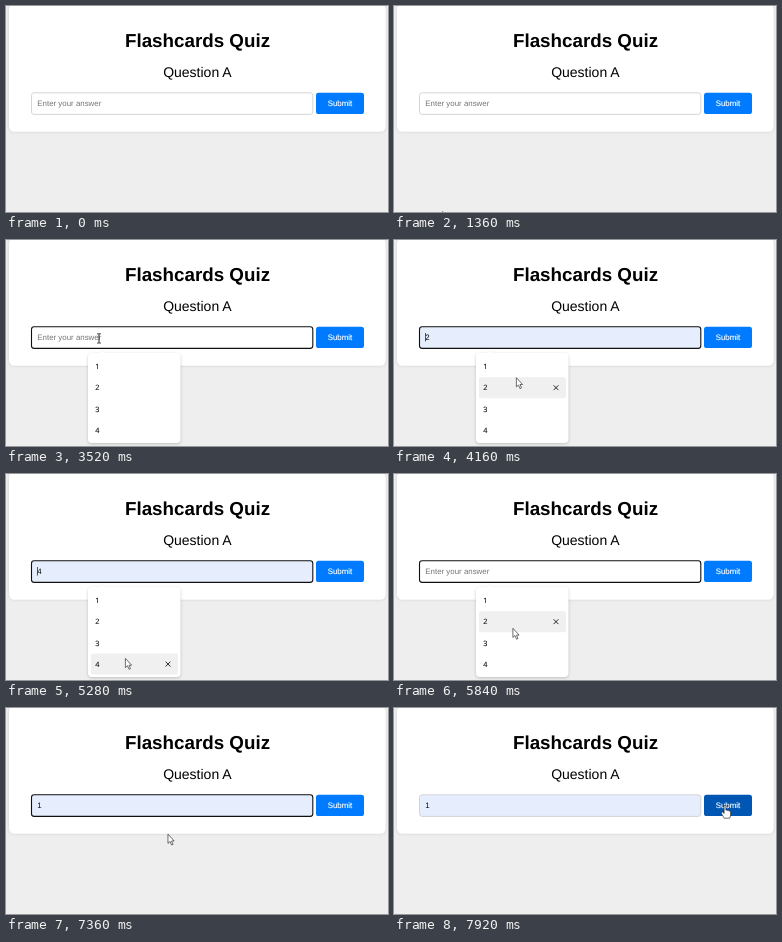
Animation, 382 px wide and 206 px high, one loop 8 s. Source, as an HTML page:

```html
<!DOCTYPE html>
<html lang="en">
<head>
<meta charset="utf-8">
<title>Flashcards Quiz</title>
<style>
  html, body { margin: 0; width: 100%; height: 100%; overflow: hidden; background: #eee; }
  svg { display: block; width: 100%; height: 100%; }
  text { font-family: "Liberation Sans", Arial, sans-serif; text-rendering: geometricPrecision; }
  .mid { text-anchor: middle; }
  .small { font-size: 7.9px; }
  .item { font: 7.3px "Open Sans", sans-serif; fill: #111; stroke: #111; stroke-width: .15px; }
  .label { fill: #fff; stroke: #fff; stroke-width: .15px; }
  .card { filter: drop-shadow(0 .5px 1.8px rgba(0, 0, 0, .13)); }
  .menu { filter: drop-shadow(0 1px 1.5px rgba(0, 0, 0, .2)); }
</style>
</head>
<body>
<svg viewBox="0 0 382 206">
  <rect width="382" height="206" fill="#eee"/>
  <rect class="card" x="3" y="-2" width="376.7" height="127.8" rx="5.5" fill="#fff"/>
  <text class="mid" x="191.5" y="40.7" font-size="18.8" font-weight="bold">Flashcards Quiz</text>
  <text class="mid" x="191.4" y="71.3" font-size="14">Question A</text>

  <rect id="field" x="25.5" y="86.8" width="281.3" height="21.6" rx="2.6"/>
  <text id="value" class="small" x="31.3" y="99.7"></text>
  <rect id="caret" x="31" y="93" width=".7" height="8.5" fill="#111"/>

  <rect id="button" x="310" y="86.8" width="48" height="21.3" rx="2.6"/>
  <text class="mid small label" x="334" y="99.7">Submit</text>

  <g id="menu">
    <path class="menu" fill="#fff" d="M86 113H93.5L96.5 111.2L99.5 113H170.5Q174.5 113 174.5 117V199Q174.5 203 170.5 203H86Q82 203 82 199V117Q82 113 86 113Z"/>
    <g id="hover">
      <rect x="85" y="-10.5" width="87" height="21" rx="2" fill="#f0f0f0"/>
      <path d="M159.6 -2.4l4.8 4.8m0 -4.8l-4.8 4.8" stroke="#111" stroke-width=".9"/>
    </g>
    <g id="items"></g>
  </g>

  <g id="pointer" stroke="#222" stroke-width=".65">
    <path id="arrow" d="M.4 .4V9.6L2.5 7.7L4 11.3L5.5 10.6L4 7.2H6.6Z" fill="#fff"/>
    <path id="beam" d="M-1.8 -4.2H-.5L0 -3.8L.5 -4.2H1.8M0 -3.8V4.6M-1.8 5H-.5L0 4.6L.5 5H1.8" fill="none" stroke-width="1"/>
    <path id="hand" d="M-.9 .2Q0 -.8 .9 .2V4.6Q2 4 2.6 4.9Q3.8 4.4 4.2 5.4Q5.6 5.2 5.6 6.6V9.4Q5.5 11.2 4.6 12.6H-.8Q-2.2 10.2 -3.7 7.6Q-3.8 6.1 -2.3 6.4L-.9 7.8Z" fill="#fff" stroke-linejoin="round"/>
  </g>
</svg>
<script>
const LOOP = 8000, STEP = 80;
const ENTER = 1360, OPEN = 3040, CLOSE = 6800, BLUR = 7920;
const BLINK = 535;
const ROW_TOP = 115.9, ROW_H = 21.2;

// Pointer glides: first and last step of each, and where it ends
const ORIGIN = [44, 216];
const GLIDES = [
  { from: ENTER, until: 2160, to: [76.5, 134.5] },
  { from: 2240, until: 2720, to: [93, 98] },
  { from: 3600, until: 3600, to: [112, 127] },
  { from: 3760, until: 4000, to: [122, 137.3] },
  { from: 4560, until: 4720, to: [120, 170] },
  { from: 5200, until: 5280, to: [119, 184] },
  { from: 5680, until: 6240, to: [118, 124.5] },
  { from: CLOSE, until: 7040, to: [124, 132] },
  { from: 7360, until: BLUR, to: [331, 97.6] }
];

const $ = id => document.getElementById(id);
const show = (id, on) => $(id).setAttribute("visibility", on ? "inherit" : "hidden");
const set = (id, attrs) => {
  for (const key in attrs) $(id).setAttribute(key, attrs[key]);
};
const easeOut = k => 1 - (1 - k) ** 1.5;
const rowY = i => ROW_TOP + ROW_H * (i + .5);

$("items").innerHTML = [0, 1, 2, 3]
  .map(i => `<text class="item" x="89.3" y="${rowY(i) + 2.6}">${i + 1}</text>`).join("");

function pointerAt(t) {
  return GLIDES.filter(g => g.from <= t).reduce((pos, g) => {
    const k = Math.min(1, (t - g.from + STEP) / (g.until - g.from + STEP));
    return pos.map((p, i) => p + (g.to[i] - p) * easeOut(k));
  }, ORIGIN);
}

function rowAt(t) {
  const y = pointerAt(t)[1];
  return t >= OPEN && t < CLOSE && y > ROW_TOP ? Math.floor((y - ROW_TOP) / ROW_H) : -1;
}

// The preview clears for one step whenever the pointer moves up a row
function valueAt(t) {
  if (t >= CLOSE) return "1";
  const row = rowAt(t);
  return row >= 0 && row >= rowAt(t - STEP) ? String(row + 1) : "";
}

function render(time) {
  const t = Math.floor(time % LOOP / STEP) * STEP;
  const [x, y] = pointerAt(t);
  const row = rowAt(t), text = valueAt(t);
  const open = t >= OPEN && t < CLOSE;
  const focused = t >= OPEN && t < BLUR;
  const inBand = y > 87 && y < 108.5;
  const overButton = inBand && x > 310 && x < 358;
  const overField = inBand && x > 25 && x < 307;

  set("field", {
    fill: text ? "#e6eefd" : "#fff",
    stroke: focused ? "#101010" : "#ccc",
    "stroke-width": focused ? 1.1 : .8
  });
  $("value").textContent = text || "Enter your answer";
  set("value", { fill: text ? "#111" : "#757575" });
  show("caret", open && (t - OPEN + 60) % (2 * BLINK) < BLINK);
  set("button", { fill: overButton ? "#0056b3" : "#007bff" });

  show("menu", open);
  show("hover", row >= 0);
  set("hover", { transform: `translate(0 ${rowY(row)})` });

  show("pointer", t >= ENTER);
  set("pointer", { transform: `translate(${x} ${y})` });
  show("arrow", !overButton && !overField);
  show("beam", overField);
  show("hand", overButton);
}

const start = performance.now();
function tick() {
  render(performance.now() - start);
  requestAnimationFrame(tick);
}
tick();
</script>
</body>
</html>
```
